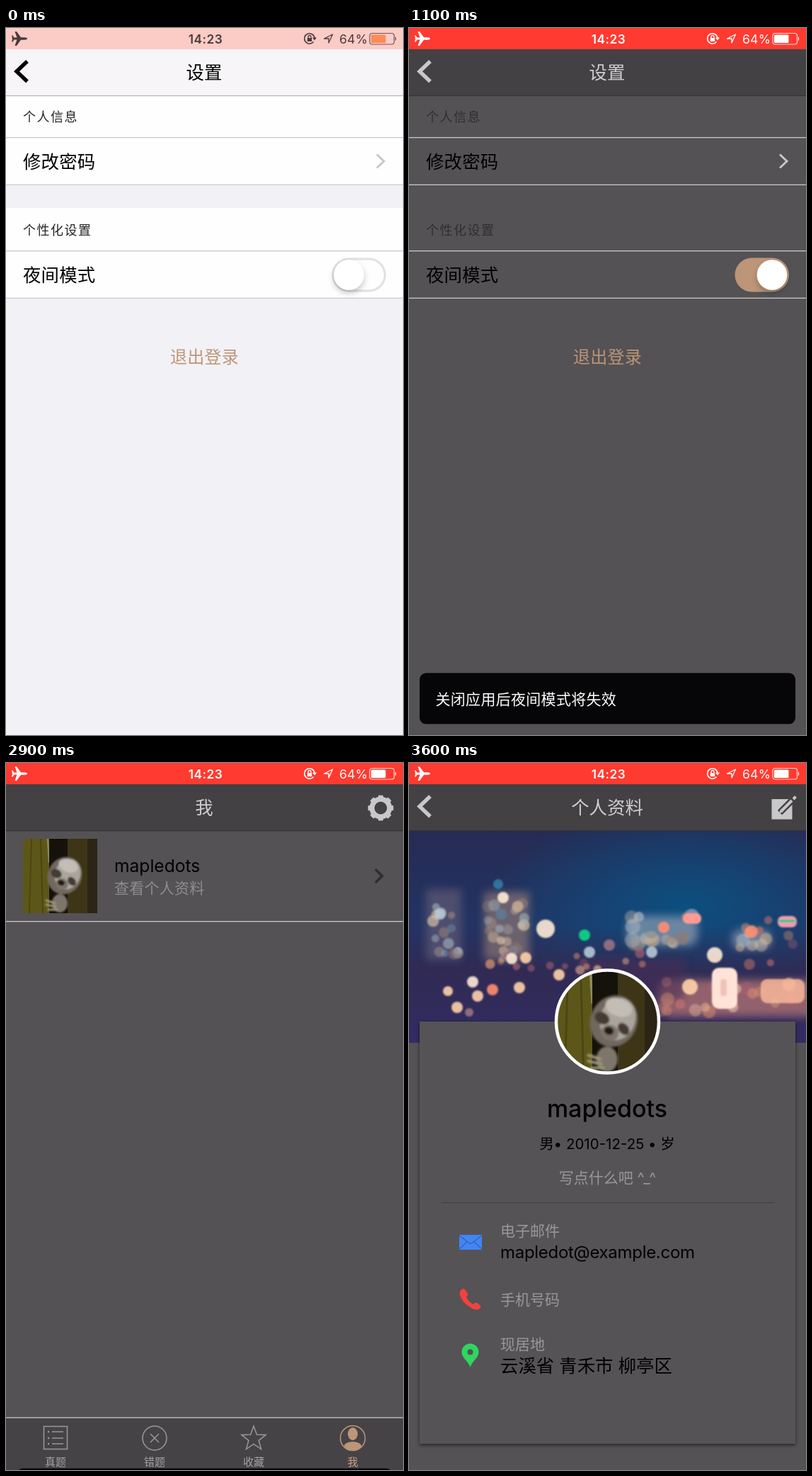
An HTML page for the animation above (3700 ms loop, 561 px wide and 998 px high).

```html
<!DOCTYPE html>
<html lang="zh-CN">
<head>
<meta charset="utf-8">
<title>设置</title>
<style>
html, body { margin: 0; width: 100%; height: 100%; overflow: hidden; background: #545254; }
svg { display: block; width: 100%; height: 100%; }
text { font-family: Inter, "Noto Sans CJK SC", "Noto Sans CJK", sans-serif; white-space: pre; }
.body { fill: #f2f1f5; }
.head { fill: #f7f5f7; }
.edge { fill: #b4b3b5; }
.title { fill: #000; }
.back { stroke: #000; }
.label { fill: #262526; }
.line { fill: #c9c8cc; }
.dark .body { fill: #545254; }
.dark .head { fill: #434143; }
.dark .edge { fill: #343234; }
.dark .title { fill: #cfcdcf; }
.dark .back { stroke: #c8c7c9; }
.dark .label { fill: #302f30; }
</style>
</head>
<body>
<script>
const W = 561, H = 998, LOOP = 3700;
const GREY = '#c8c7c9', PALE = '#99979a', TAN = '#bd9578';

// markup helpers; a fill starting with a dot names a class
const paint = fill => fill[0] === '.' ? `class="${fill.slice(1)}"` : `fill="${fill}"`;
const rect = (x, y, w, h, fill, more = '') =>
  `<rect x="${x}" y="${y}" width="${w}" height="${h}" ${paint(fill)} ${more}/>`;
const text = (x, cy, size, str, fill = '#000', more = '') =>
  `<text x="${x}" y="${cy + size * 0.37}" font-size="${size}" ${paint(fill)} ${more}>${str}</text>`;
const MID = 'text-anchor="middle"';
const stroke = (d, color, width, more = '') =>
  `<path d="${d}" fill="none" stroke="${color}" stroke-width="${width}" ${more}/>`;
const dot = (x, y, r, fill, more = '') => `<circle cx="${x}" cy="${y}" r="${r}" fill="${fill}" ${more}/>`;
const ring = (x, y, r, color, width, more = '') =>
  `<circle cx="${x}" cy="${y}" r="${r}" fill="none" stroke="${color}" stroke-width="${width}" ${more}/>`;
const oval = (x, y, rx, ry, fill, turn = 0) =>
  `<ellipse rx="${rx}" ry="${ry}" fill="${fill}" transform="translate(${x} ${y}) rotate(${turn})"/>`;
const line = y => rect(0, y, W, 1.3, '.line');
const header = (title, more = '') =>
  rect(0, 30, W, 66, '.head') + rect(0, 95, W, 1.2, '.edge') +
  text(280, 62.5, 25.4, title, '.title', `${MID} font-weight="500" ${more}`);

function random(seed) {
  return () => (seed = (seed * 16807) % 2147483647) / 2147483647;
}

// soft city lights behind the profile card
function city() {
  const rnd = random(41), pick = list => list[Math.floor(rnd() * list.length)];
  const warm = ['#e8b48e', '#d9906e', '#c9706a', '#f0c8a6', '#a85f72'];
  const cool = ['#9fb0bd', '#8d7c78', '#c2a98f', '#5f7f9c', '#d8c0a6'];
  let s = rect(0, 96, W, 300, 'url(#night)') + rect(0, 96, W, 300, 'url(#glow)') +
    rect(0, 230, W, 166, 'url(#street)');
  s += '<g filter="url(#soft)">' +
    rect(24, 178, 50, 100, '#6a6078', 'opacity=".6"') + rect(106, 182, 64, 96, '#8a7674', 'opacity=".7"') +
    rect(308, 216, 100, 42, '#8b9bb0', 'opacity=".75" rx="14"') + rect(457, 236, 54, 26, '#9aa3b5', 'opacity=".7" rx="10"') +
    rect(352, 306, 230, 52, '#c87f78', 'opacity=".65" rx="20"') + rect(240, 276, 150, 60, '#4a2f58', 'opacity=".6"') +
    '</g><g filter="url(#blur)">';
  const spread = (n, x, y, w, h, colors, r) => {
    for (let i = 0; i < n; i++)
      s += dot(x + rnd() * w, y + rnd() * h, r * (0.7 + rnd() * 0.5), pick(colors), `opacity="${0.3 + rnd() * 0.45}"`);
  };
  spread(14, 34, 190, 36, 84, cool, 7);
  spread(24, 110, 186, 54, 88, cool, 7.5);
  spread(18, 312, 216, 92, 40, cool, 9);
  spread(8, 460, 238, 46, 22, cool, 9);
  spread(16, 90, 268, 240, 26, warm, 6);
  spread(20, 350, 304, 205, 50, warm, 9);
  spread(8, 470, 220, 90, 70, warm, 7);
  const spots = [
    [55, 322, 7, 0], [90, 309, 8, 1], [97, 329, 8, 0], [118, 320, 8, 2], [68, 345, 8, 0], [85, 352, 6, 3],
    [156, 317, 8, 0], [145, 276, 8, 1], [165, 275, 8, 0], [193, 234, 13, 1], [212, 299, 8, 0], [255, 267, 8, 4],
    [44, 213, 8, 4], [126, 171, 7, 5], [133, 190, 8, 1], [343, 267, 8, 4], [283, 257, 8, 3], [360, 232, 8, 2],
    [432, 271, 11, 1], [484, 238, 9, 2], [397, 316, 11, 0]
  ];
  const tones = ['#ffd2a8', '#ffead6', '#ff8f70', '#9a7284', '#b6c8d4', '#317ca0'];
  for (const [x, y, r, c] of spots) s += dot(x, y, r, tones[c], 'opacity=".9"');
  s += rect(387, 212, 26, 15, '#ff9a94', 'rx="7"') + rect(521, 216, 27, 16, '#f49ab0', 'rx="7"') +
    rect(522, 221, 24, 4, '#19c888', 'rx="2"') +
    rect(428, 289, 36, 58, '#ffe3d6', 'rx="10"') + rect(440, 305, 9, 24, '#f0c3b8', 'rx="4"') +
    rect(497, 305, 62, 34, '#ffbd9e', 'rx="9" opacity=".8"') + dot(248, 243, 8, '#10c982');
  return s + '</g>';
}

// animal peeking between planks, in a 105 square
const sloth =
  rect(0, 0, 105, 105, '#2a2112') + rect(0, 0, 37, 105, '#5c5718') +
  stroke('M12 0L9 105M25 0L28 105', '#4a4513', 2) + stroke('M35 0L37 34', '#8f8960', 2.5) +
  rect(37, 0, 26, 105, '#15110b') + rect(63, 0, 28, 105, '#3d3516') + rect(91, 0, 14, 105, '#2b2417') +
  '<g filter="url(#blur)">' +
  oval(52, 91, 11, 13, '#7d766b') + oval(59, 52, 24, 27, '#6f685e', 25) +
  oval(63, 50, 18, 22, '#aaa59c', 20) + oval(64, 38, 14, 9, '#c2beb6', 20) +
  oval(47, 49, 8, 6, '#443a32', 30) + oval(69, 60, 7, 5, '#443a32', 50) +
  oval(55, 64, 9, 8, '#7d736a', 20) + oval(54, 62, 5, 4, '#1f1a17', 20) +
  stroke('M33 87L45 91M33 93L46 96M36 100L48 100', '#a09678', 3, 'stroke-linecap="round"') + '</g>';

const TABS = ['真题', '错题', '收藏', '我'];
const star = Array.from({ length: 10 }, (_, i) => {
  const a = i * Math.PI / 5, r = i % 2 ? 7.5 : 18;
  return `${350 + r * Math.sin(a)},${954 - r * Math.cos(a)}`;
}).join(' ');

const tabs = rect(0, 924, W, 74, '#454346') + line(923.5) +
  stroke('M53.5 936.5H86.5V968.5H53.5Z', PALE, 1.5) +
  stroke('M65 944H81M65 953H81M65 961H81', PALE, 1.5) + stroke('M59 944H61M59 953H61M59 961H61', PALE, 2.5) +
  ring(210, 953, 17, PALE, 1.5) + stroke('M204 947L216 959M216 947L204 959', PALE, 1.5) +
  `<polygon points="${star}" fill="none" stroke="${PALE}" stroke-width="1.5"/>` +
  ring(490, 953, 17.5, TAN, 1.5) + oval(490, 947, 7, 9, TAN) + oval(490, 964, 12, 6, TAN) +
  TABS.map((s, i) => text(70 + i * 140, 986.5, 15, s, i === 3 ? '#c9a183' : '#a3a1a4', MID)).join('');

const me = `<g id="me">
  ${rect(0, 96, W, 902, '#545254')}
  <g id="meBody">
    ${rect(0, 96, W, 128, '#8c8a8c', 'id="tap"')}
    <g transform="translate(24 107)" clip-path="url(#square)">${sloth}</g>
    ${text(153, 144.5, 24.6, 'mapledots')}
    ${text(153, 176.5, 21, '查看个人资料', '#8f8d90', 'letter-spacing=".25"')}
    ${stroke('M522 150L531.5 159.5L522 169', '#2f2d30', 3.6)}
    ${line(223)}
  </g>
  ${rect(0, 96, W, 828, '#000', 'id="dim"')}
  ${tabs}
  ${header('我', 'id="meTitle"')}
</g>`;

const settings = `<g id="settings">
  ${rect(0, 96, W, 902, '.body')}
  <g id="rows">${rect(0, 96, W, 126, 'inherit')}${rect(0, 254, W, 128, 'inherit')}</g>
  ${[154, 220.7, 314, 380.7].map(line).join('')}
  ${text(24, 125, 18, '个人信息', '.label', 'letter-spacing="1.5"')}
  ${text(24, 188.5, 25.4, '修改密码', '#000', 'letter-spacing=".2"')}
  ${stroke('M524 178.5L534 188L524 197.5', '#c7c6ca', 3)}
  ${text(24, 285, 18, '个性化设置', '.label', 'letter-spacing="1.5"')}
  ${text(24, 348.5, 25.4, '夜间模式', '#000', 'letter-spacing=".2"')}
  ${rect(460.5, 324.5, 76.5, 48, '#e2e0e2', 'rx="24" id="track"')}
  ${rect(-35.2, -21, 70.4, 42, '#fefefe', 'rx="21" id="inner"')}
  ${dot(484.5, 348.5, 21.3, '#fff', 'id="knob" filter="url(#drop)"')}
  ${text(280.5, 464, 24, '退出登录', TAN, `${MID} letter-spacing=".3"`)}
  ${header('设置')}
</g>`;

const profile = `<g id="profile">
  ${rect(0, 96, W, 902, '#545254')}
  <g clip-path="url(#banner)">${city()}</g>
  ${rect(15, 365, 531, 570, '#545254', 'id="card" filter="url(#lift)"')}
  <g clip-path="url(#round)"><g transform="translate(208 292.5) scale(1.38)">${sloth}</g></g>
  ${ring(280.5, 365, 72.5, '#fff', 4.5)}
  ${text(280, 487.5, 34, 'mapledots', '#000', `${MID} font-weight="500"`)}
  ${text(280, 537.5, 20.5, '男• 2010-12-25 • 岁', '#000', MID)}
  ${text(280.5, 585.5, 21, '写点什么吧 ^_^', PALE, MID)}
  ${rect(46, 620, 470, 1.2, '#444244')}
  ${rect(71, 666, 32, 21, '#4285f4')}
  ${stroke('M71 667L87 679L103 667M71 686L82 676M103 686L92 676', '#2b4f8f', 1)}
  ${text(129, 660.5, 21, '电子邮件', PALE)}
  ${text(129, 690, 24, 'mapledot@example.com', '#000', 'letter-spacing="-.3"')}
  <path d="M74 743.5Q77 741 79 743L83 749Q84 751 81 754Q84 761 91 764Q94 761 96 762L101 766Q102 768 100 770Q95 774 86 768Q75 761 72 751Q71 746 74 743.5Z" fill="#f5413d"/>
  ${text(129, 757, 21, '手机号码', PALE)}
  <g id="pin"><path d="M86.5 840C83 830 74.5 827 74.5 818.5A12 12 0 0 1 98.5 818.5C98.5 827 90 830 86.5 840Z" fill="#2fd65f"/>${dot(86.5, 818.5, 4, '#545254')}</g>
  <g id="home">${text(129, 824, 21, '现居地', PALE)}</g>
  ${text(129, 850.5, 25.4, '云溪省 青禾市 柳亭区', '#000', 'id="address"')}
  ${header('个人资料')}
</g>`;

const chrome = `
  <path id="back" class="back" d="M30 47L15 61.2L30 75.5" fill="none" stroke-width="5.4"/>
  <g id="gear">
    ${ring(529.5, 63.5, 12.4, GREY, 7)}
    ${ring(529.5, 63.5, 15.7, GREY, 4.6, 'pathLength="16" stroke-dasharray="1.1 .9" stroke-dashoffset=".55"')}
  </g>
  <g id="edit">${rect(512.5, 51, 29, 28.5, GREY)}
    ${stroke('M524 70L548 46', '#434143', 9)}${stroke('M527 67L541 53M543 51L546.5 47.5', GREY, 4)}
    <path d="M523 71L525 65L529 69Z" fill="${GREY}"/></g>
  <g id="status">
    ${rect(0, 0, W, 30, '#ff3a30', 'id="bar"')}
    <path d="M8 15Q8 13.5 10 13.5L15.5 13.5L12.5 5H15L21 13.3H26Q30 13.5 30 15Q30 16.5 26 16.7H21L15 25H12.5L15.5 16.5H11.5L9.5 19.5H8L9.2 15L8 10.5H9.5L11.5 13.5Z" fill="currentColor"/>
    ${text(282, 15.5, 17.3, '14:23', 'currentColor', `${MID} font-weight="600" letter-spacing=".5"`)}
    ${stroke('M434.5 19.5A7.2 7.2 0 1 1 436 14', 'currentColor', 1.6)}
    <path d="M433 13.5H439L436 17.5Z" fill="currentColor"/>
    ${rect(425.8, 14, 6.4, 5, 'currentColor')}${stroke('M427 14V12.5A2 2 0 0 1 431 12.5V14', 'currentColor', 1.3)}
    ${stroke('M449.5 15L461.5 9L456 21V15Z', 'currentColor', 1.3, 'stroke-linejoin="round"')}
    ${text(471, 15.5, 17.6, '64%', 'currentColor', 'letter-spacing=".2"')}
    <rect x="514" y="7.5" width="34.5" height="15.5" rx="3.5" fill="none" stroke="currentColor" stroke-width="1.2" opacity=".8"/>
    ${rect(516, 9.5, 20.5, 11.5, '#fff', 'rx="1.5" id="charge"')}
    <path d="M550 12Q552.5 15.2 550 18.5Z" fill="currentColor"/>
  </g>
  <g id="toast">${rect(15, 911, 531, 72, '#030204', 'rx="9" opacity=".95"')}
    ${text(37.5, 947.5, 21, '关闭应用后夜间模式将失效', '#fff', 'letter-spacing=".3"')}</g>`;

const defs = `<defs>
  <linearGradient id="night" x2="0" y2="1"><stop stop-color="#262b54"/><stop offset=".45" stop-color="#233463"/><stop offset="1" stop-color="#2e2d62"/></linearGradient>
  <radialGradient id="glow" cx=".7" cy=".36" r=".5"><stop stop-color="#0c4f80"/><stop offset="1" stop-color="#0c4f80" stop-opacity="0"/></radialGradient>
  <linearGradient id="street" x2="0" y2="1"><stop stop-color="#33284f" stop-opacity="0"/><stop offset=".4" stop-color="#33284f" stop-opacity=".75"/><stop offset="1" stop-color="#342c64" stop-opacity=".8"/></linearGradient>
  <filter id="blur"><feGaussianBlur stdDeviation="1.2"/></filter>
  <filter id="soft"><feGaussianBlur stdDeviation="6"/></filter>
  <filter id="drop" x="-50%" y="-50%" width="200%" height="200%"><feDropShadow dx="0" dy="4" stdDeviation="4.5" flood-opacity=".24"/></filter>
  <filter id="lift" x="-5%" y="-5%" width="110%" height="110%"><feDropShadow dx="0" dy="2" stdDeviation="2.5" flood-opacity=".55"/></filter>
  <clipPath id="square"><rect width="105" height="105"/></clipPath>
  <clipPath id="banner"><rect y="96" width="561" height="299"/></clipPath>
  <clipPath id="round"><circle cx="280.5" cy="365" r="72"/></clipPath>
</defs>`;

document.body.innerHTML =
  `<svg id="stage" viewBox="0 0 ${W} ${H}" preserveAspectRatio="none">${defs}${me}${settings}${profile}${chrome}</svg>`;
const $ = id => document.getElementById(id);
const set = (id, attrs) => { for (const k in attrs) $(id).setAttribute(k, attrs[k]); };
const show = (id, on) => set(id, { visibility: on ? 'visible' : 'hidden' });
const move = (id, x, y = 0) => set(id, { transform: `translate(${x} ${y})` });

const clamp = v => Math.max(0, Math.min(1, v));
const span = (t, from, length) => clamp((t - from) / length);
const mix = (a, b, p) => `rgb(${a.map((v, i) => Math.round(v + (b[i] - v) * p))})`;

function bezier(x1, y1, x2, y2) {
  const at = (a, b, s) => 3 * a * s * (1 - s) ** 2 + 3 * b * s * s * (1 - s) + s ** 3;
  return x => {
    if (x <= 0 || x >= 1) return clamp(x);
    let lo = 0, hi = 1;
    for (let i = 0; i < 24; i++) {
      const m = (lo + hi) / 2;
      if (at(x1, x2, m) < x) lo = m; else hi = m;
    }
    return at(y1, y2, lo);
  };
}
const ease = bezier(0.25, 0.1, 0.25, 1);
const slide = bezier(0.36, 0.66, 0.04, 1);
const bounce = bezier(0.155, 1.105, 0.295, 1.12);

function draw(t) {
  set('stage', { class: t >= 650 ? 'dark' : '' });

  // status bar turning red
  const red = span(t, 0, 300), white = [255, 255, 255];
  set('bar', { fill: mix([251, 203, 199], [255, 58, 48], red) });
  set('status', { color: mix([74, 58, 58], white, red) });
  set('charge', { fill: mix([255, 139, 82], white, red) });

  // night mode switch
  const on = ease(span(t, 590, 300));
  set('track', { fill: mix([226, 224, 226], [189, 149, 120], on) });
  set('inner', { transform: `translate(498.8 348.5) scale(${1 - ease(span(t, 515, 300))})` });
  set('knob', { cx: 484.5 + 28.5 * on });
  set('rows', { fill: mix([254, 254, 254], [84, 82, 84], span(t, 654, 200)) });

  // page transitions
  const pop = slide(span(t, 1850, 500)), push = slide(span(t, 3064, 500));
  const depth = 1 - pop + push;
  show('settings', pop < 1);
  show('me', pop > 0 && push < 1);
  show('profile', push > 0);
  move('settings', W * pop);
  move('profile', W * (1 - push));
  move('meBody', -185 * depth);
  move('meTitle', -185 * depth);
  set('meTitle', { opacity: 1 - depth * 0.85 });
  set('dim', { opacity: 0.22 * depth });
  show('tap', t >= 3000);
  set('back', { opacity: clamp(depth * 1.35) });
  set('gear', { opacity: pop > 0 ? clamp(1 - depth * 1.35) : 0 });
  set('edit', { opacity: clamp(push * 1.35) });

  // address arrives late and stretches the card
  const loaded = t >= 3400;
  set('card', { height: loaded ? 596 : 570 });
  move('pin', 0, loaded ? 13 : 0);
  move('home', 0, loaded ? -4 : 0);
  set('address', { opacity: loaded ? 1 : 0 });

  const rise = bounce(span(t, 712, 400)) - slide(span(t, 2712, 300));
  move('toast', 0, 87 * (1 - rise));
}

const start = performance.now();
function tick() {
  draw((performance.now() - start) % LOOP);
  requestAnimationFrame(tick);
}
tick();
</script>
</body>
</html>
```
